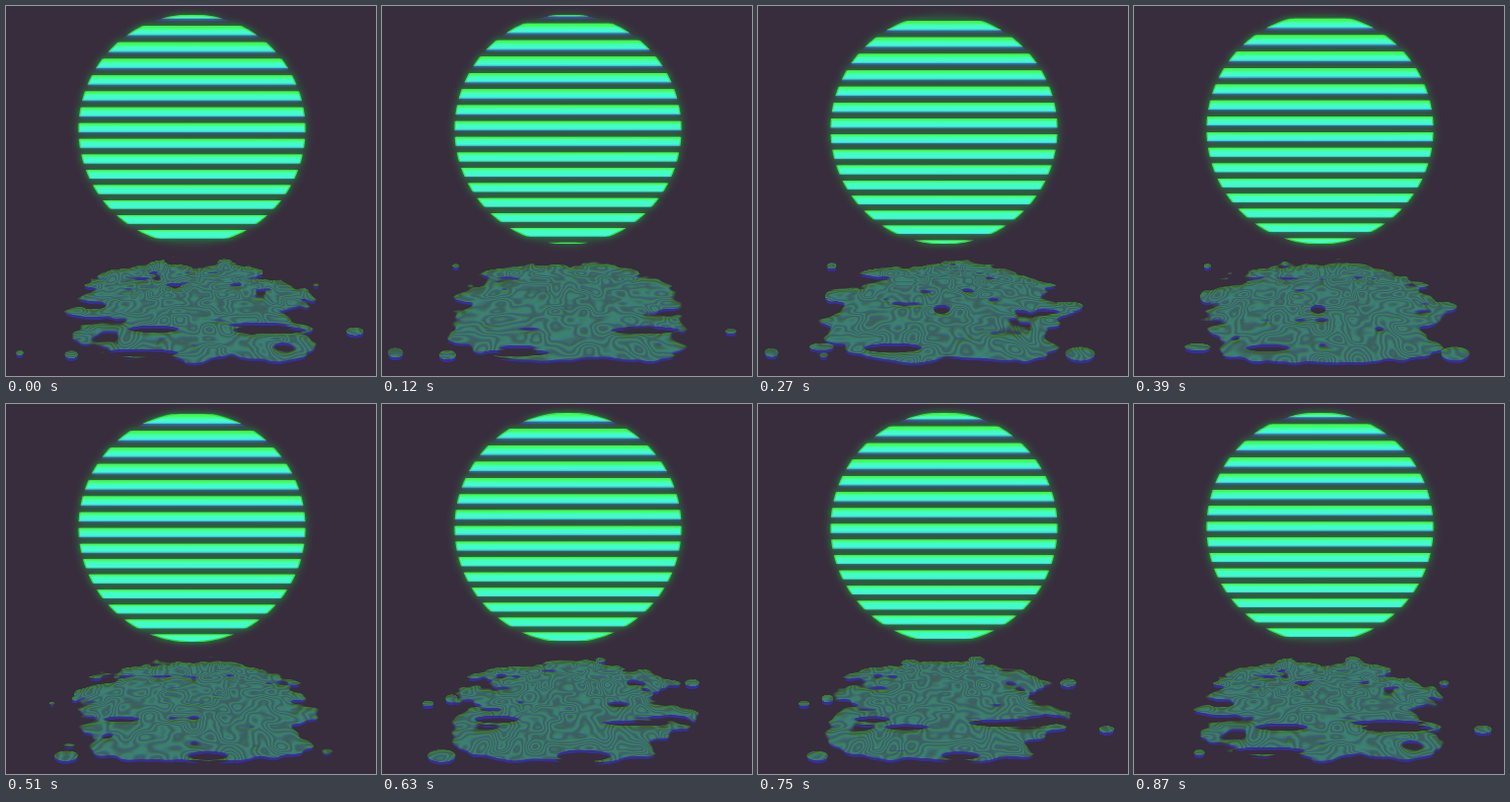
Write an HTML page with a canvas that moves like this. It is 375 by 375 pixels and loops after 900 ms.

```html
<!DOCTYPE html>
<html lang="en">
<head>
<meta charset="utf-8">
<title>Striped sun over water</title>
<style>
  html, body { margin: 0; width: 100%; height: 100%; overflow: hidden; background: #372d3c; }
  canvas { display: block; width: 375px; height: 375px; }
</style>
</head>
<body>
<canvas id="stage" width="375" height="375"></canvas>
<script>
const SIZE = 375, LOOP = 900, STEP = 30;
const BG = [55, 45, 60];
const ctx = document.getElementById('stage').getContext('2d');
const clamp = (v, a = 0, b = 1) => Math.min(b, Math.max(a, v));
const mix = (a, b, t) => a + (b - a) * t;

// ---- Sun: bands climb by one slot per loop ----
const SUN = { x: 188.5, y: 125, rx: 114.5, ry: 116 };
const slotY = k => 20 + 16.95 * k - 0.079 * k * k;

function bandPath(top, bottom, grow) {
  const rx = SUN.rx + grow, ry = SUN.ry + grow;
  const half = y => rx * Math.sqrt(Math.max(0, 1 - ((y - SUN.y) / ry) ** 2));
  const n = 8, right = [];
  ctx.beginPath();
  for (let i = 0; i <= n; i++) {
    const y = mix(top, bottom, i / n), h = half(y);
    ctx.lineTo(SUN.x - h, y);
    right.push([SUN.x + h, y]);
  }
  right.reverse().forEach(p => ctx.lineTo(...p));
  ctx.closePath();
}

function drawBand(k) {
  const sunTop = SUN.y - SUN.ry, sunBottom = SUN.y + SUN.ry;
  const start = slotY(k);
  const top = Math.max(start, sunTop);
  const bottom = Math.min(start + 9.6 - 0.08 * k, sunBottom);
  if (bottom - top < 0.3) return;

  const high = clamp(1 - (top - sunTop) / 232) ** 1.4;
  const fringe = 1 + 3 * high;
  const under = Math.min(bottom + fringe, sunBottom);

  const blue = ctx.createLinearGradient(0, bottom - 1, 0, bottom + fringe);
  blue.addColorStop(0, 'rgb(60,90,225)');
  blue.addColorStop(0.5, 'rgba(62,70,190,.85)');
  blue.addColorStop(1, 'rgba(60,50,120,0)');
  bandPath(bottom - 1, under, 0);
  ctx.fillStyle = blue;
  ctx.fill();

  ctx.save();
  ctx.shadowColor = 'rgba(30,200,60,.6)';
  ctx.shadowBlur = 6;
  bandPath(top, bottom, 0.6);
  ctx.fillStyle = '#35e046';
  ctx.fill();
  ctx.restore();

  const h = bottom - top, greenPart = clamp((1.2 + 2.6 * high) / h, 0.1, 0.6);
  const body = ctx.createLinearGradient(0, top, 0, bottom);
  body.addColorStop(0, '#3cf546');
  body.addColorStop(greenPart * 0.7, '#42ff62');
  body.addColorStop(Math.min(greenPart + 0.12, 0.75), '#42ffbe');
  body.addColorStop(0.82, '#40fad2');
  body.addColorStop(1, high > 0.3 ? '#3cb4ee' : '#3cdcc8');
  bandPath(top, bottom, -0.7);
  ctx.fillStyle = body;
  ctx.fill();
}

function drawSun(phase) {
  const glow = ctx.createRadialGradient(SUN.x, SUN.y, 108, SUN.x, SUN.y, 126);
  glow.addColorStop(0, 'rgba(50,100,75,.3)');
  glow.addColorStop(0.4, 'rgba(45,105,65,.3)');
  glow.addColorStop(1, 'rgba(55,45,60,0)');
  ctx.fillStyle = glow;
  ctx.fillRect(0, 0, SIZE, 255);
  for (let k = -1; k < 16; k++) drawBand(k - phase);
}

// ---- Looping value noise ----
let seed = 41;
const rand = () => (seed = (seed * 16807) % 2147483647) / 2147483647;
const perm = Array.from({ length: 256 }, (_, i) => i);
for (let i = 255; i > 0; i--) {
  const j = Math.floor(rand() * (i + 1));
  [perm[i], perm[j]] = [perm[j], perm[i]];
}
const CELLS = 4;
const hash = (x, y, t) => perm[(perm[(perm[x & 255] + y) & 255] + t) & 255] / 127.5 - 1;
const ease = f => f * f * (3 - 2 * f);

function noise(x, y, t, salt) {
  const xi = Math.floor(x), yi = Math.floor(y), ti = Math.floor(t);
  const fx = ease(x - xi), fy = ease(y - yi);
  const layer = n => {
    const s = n % CELLS + salt;
    return mix(mix(hash(xi, yi, s), hash(xi + 1, yi, s), fx),
               mix(hash(xi, yi + 1, s), hash(xi + 1, yi + 1, s), fx), fy);
  };
  return mix(layer(ti), layer(ti + 1), ease(t - ti));
}

// ---- Water: x, y, half width, half height, time of peak ----
const ISLANDS = [
  [13, 352, 8, 5, 170], [325, 353, 15, 7, 330], [353, 330, 9, 4, 860],
  [46, 304, 6, 3, 690], [70, 299, 6, 4, 680], [74, 295, 7, 6, 370],
  [64, 346, 14, 4, 330], [314, 283, 8, 4, 730], [221, 260, 8, 4, 790],
  [154, 263, 10, 4, 830], [312, 305, 16, 5, 310], [74, 264, 5, 3, 270],
  [66, 354, 9, 5, 100], [60, 357, 14, 6, 630]
];
const HOLES = [
  [135, 352, 38, 4, 30], [268, 329, 40, 4, 30], [135, 347, 30, 5, 270],
  [186, 308, 9, 5, 300], [205, 357, 30, 6, 620], [116, 320, 24, 4, 640],
  [258, 324, 46, 4, 760], [150, 328, 28, 4, 850]
];
const TOP = 252, ROWS = 120;

function activeSpots(list, t) {
  return list.map(([x, y, w, h, peak]) => {
    const gap = Math.abs(t - peak), d = Math.min(gap, LOOP - gap);
    return { x, y, w, h, a: 1 - (d / 190) ** 2 };
  }).filter(s => s.a > 0);
}

function spotLevel(spots, x, y) {
  let best = -1;
  for (const s of spots) {
    const r = ((x - s.x) / s.w) ** 2 + ((y - s.y) / s.h) ** 2;
    best = Math.max(best, s.a - r);
  }
  return best;
}

function renderWater(t) {
  const field = new Float32Array(SIZE * ROWS), lines = new Float32Array(SIZE * ROWS);
  const time = t / LOOP * CELLS;
  const islands = activeSpots(ISLANDS, t), holes = activeSpots(HOLES, t);

  for (let r = 0; r < ROWS; r++) {
    const y = TOP + r, v = (y - 260) / 103, depth = clamp(v, -0.1, 1.1);
    const width = 115 * (1 - (Math.abs(depth - 0.6) / 0.75) ** 3);
    const ny = 17.2 * Math.log(1 + 1.2 * depth) + 40;
    const edge = Math.max(0, 0.09 - v) * 11 + Math.max(0, v - 0.92) * 13;
    for (let x = 0; x < SIZE; x++) {
      const i = r * SIZE + x;
      const nx = (x - 190) / (18 + 14 * depth) + 60;
      const n = noise(nx, ny, time, 0) * 0.75 + noise(nx * 2.3, ny * 1.9, time, 20) * 0.35;
      const shape = 0.58 - 0.75 * ((x - 190) / width) ** 4 - edge;
      let f = Math.max(shape, -1.2) + n;
      f = Math.max(f, spotLevel(islands, x, y) + n * 0.35);
      f = Math.min(f, -spotLevel(holes, x, y) + n * 0.25);
      field[i] = f;
      if (f > -0.3) {
        const swirl = noise(nx * 1.7, ny * 0.9, time, 50) + n * 0.5;
        lines[i] = 0.5 + 0.5 * Math.sin(swirl * 17 + y * 0.5);
      }
    }
  }

  const img = new ImageData(SIZE, ROWS);
  const at = (a, x, r) => a[clamp(r, 0, ROWS - 1) * SIZE + x];
  for (let r = 0; r < ROWS; r++) {
    for (let x = 0; x < SIZE; x++) {
      // green sits a little higher than blue
      const gf = at(field, x, r + 1), bf = at(field, x, r - 2);
      const g = clamp(gf * 7 + 0.8), b = clamp(bf * 7 + 0.4);
      const gl = mix(0.6, 1, at(lines, x, r + 1)), bl = mix(0.6, 1, at(lines, x, r - 1));
      const fringe = b * (1 - g), o = (r * SIZE + x) * 4;
      img.data[o] = BG[0] + 4 * g;
      img.data[o + 1] = BG[1] + 84 * g * gl;
      img.data[o + 2] = BG[2] + 56 * b * bl + 50 * fringe;
      img.data[o + 3] = 255;
    }
  }
  return img;
}

// ---- Loop ----
const waterCache = new Map();
let shown = -1;

function draw(t) {
  ctx.fillStyle = `rgb(${BG})`;
  ctx.fillRect(0, 0, SIZE, SIZE);
  if (!waterCache.has(t)) waterCache.set(t, renderWater(t));
  ctx.putImageData(waterCache.get(t), 0, TOP);
  drawSun(t / LOOP);
}

function tick() {
  const t = Math.floor(performance.now() % LOOP / STEP) * STEP;
  if (t !== shown) draw(shown = t);
  requestAnimationFrame(tick);
}
tick();
</script>
</body>
</html>
```
